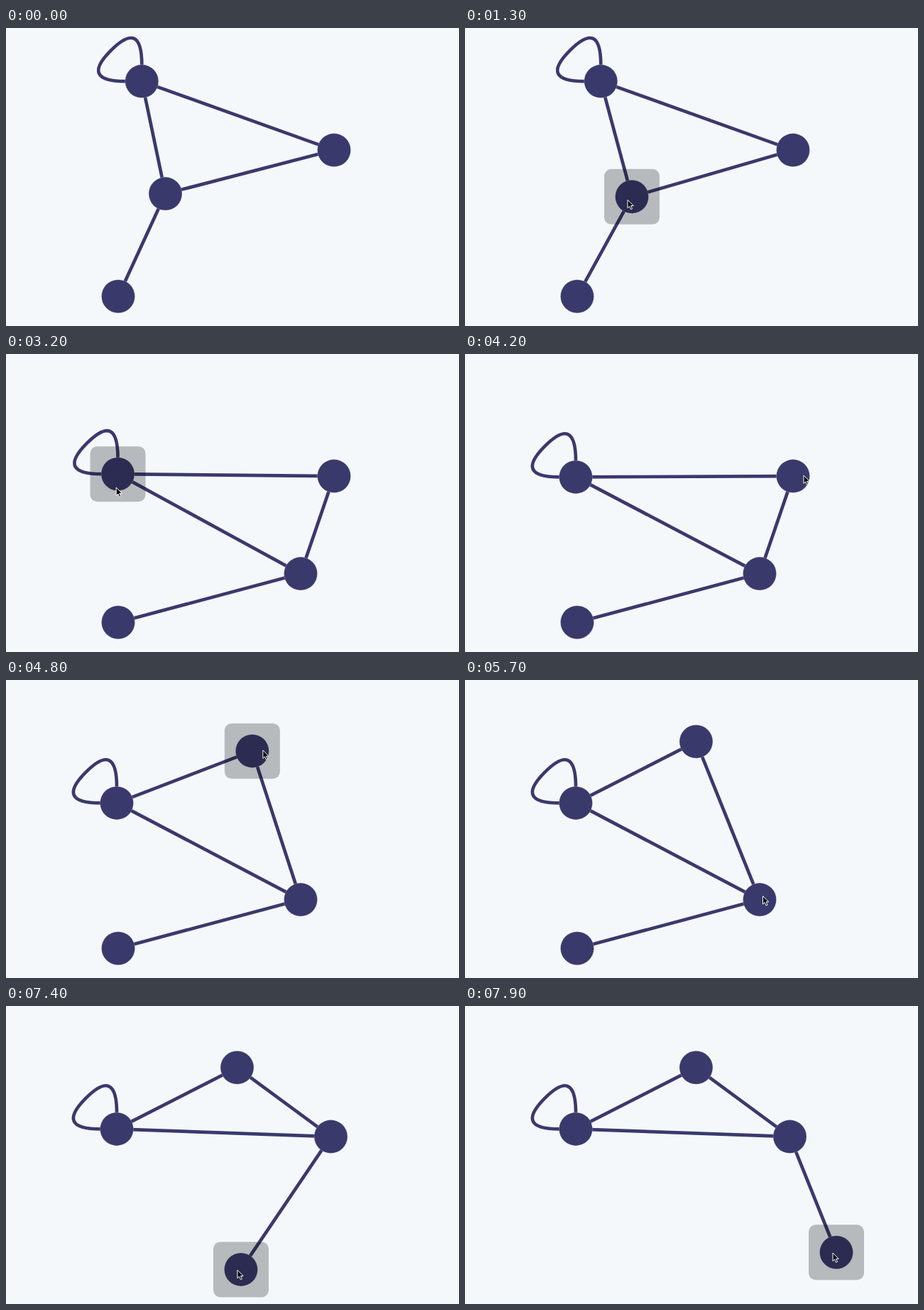
Recreate the animation shown at these times as an HTML page. Size 638 by 420 pixels, loop 8 s.

```html
<!DOCTYPE html>
<html lang="en">
<head>
<meta charset="utf-8">
<title>Draggable graph</title>
<style>
  html, body { margin: 0; width: 100%; height: 100%; overflow: hidden; background: #f4f8fb; }
  svg { display: block; width: 100%; height: 100%; }
  .edge { fill: none; stroke: #3a396c; stroke-width: 4.7; }
  .node { fill: #3a396c; stroke: #f4f8fb; stroke-opacity: .4; stroke-width: .6; }
</style>
</head>
<body>
<svg viewBox="0 0 638 420">
  <g id="graph"></g>
  <rect id="overlay" width="78" height="78" rx="10" fill="#000" fill-opacity=".25"/>
  <path id="cursor" d="M0 0V11.5L2.6 9L4.5 13.4L6.5 12.5L4.6 8.3H8.2Z" fill="#000" stroke="#fff"/>
</svg>
<script>
const DURATION = 8000, STEP = 100, RADIUS = 23.5;
const home = { a: [191.3, 75.1], b: [462, 172.1], c: [224.5, 233.6], d: [158, 378.2] };
const links = ['ab', 'ac', 'bc', 'cd'];

// Pointer moves; one with a node drags it along.
const entry = [355, 381];
const moves = [
  { start: 400, end: 800, to: [218.5, 238] },
  { start: 1200, end: 1900, to: [409, 314], node: 'c' },
  { start: 2000, end: 2400, to: [189, 94] },
  { start: 2500, end: 3300, to: [153.7, 192.3], node: 'a' },
  { start: 3400, end: 3900, to: [477, 171] },
  { start: 4200, end: 5000, to: [340.5, 85.7], node: 'b' },
  { start: 5100, end: 5700, to: [419.5, 304.5] },
  { start: 5800, end: 6200, to: [462, 179], node: 'c' },
  { start: 6400, end: 6800, to: [153, 379] },
  { start: 6800, end: 7300, to: [258, 374], node: 'd' },
  { start: 7300, end: 7600, to: [520, 367], node: 'd' },
  { start: 7700, end: 7900, to: [518, 348], node: 'd' }
];

const graph = document.getElementById('graph');
const overlay = document.getElementById('overlay');
const cursor = document.getElementById('cursor');

function add(tag, attrs) {
  const el = document.createElementNS('http://www.w3.org/2000/svg', tag);
  for (const key in attrs) el.setAttribute(key, attrs[key]);
  return graph.appendChild(el);
}

const place = (el, x, y) => el.setAttribute('transform', `translate(${x} ${y})`);
const show = (el, on) => el.setAttribute('visibility', on ? 'visible' : 'hidden');
const smooth = k => k * k * (3 - 2 * k);
const easeOut = k => 1 - (1 - k) ** 3;

const edges = links.map(() => add('path', { class: 'edge' }));
const loop = add('path', { class: 'edge', d: 'M0 -23Q0 -87 -43.5 -43.5T-23 0' });
loop.setAttribute('d', 'M0 -23Q0 -87 -43.5 -43.5Q-87 0 -23 0');
const nodes = Object.keys(home).map(id => [id, add('circle', { class: 'node', r: RADIUS })]);

function pose(t) {
  const pos = { ...home };
  let pointer = entry, held;
  for (const { start, end, to, node } of moves) {
    if (t <= start) break;
    const k = Math.min(1, (t - start) / (end - start));
    const eased = node ? smooth(k) : easeOut(k);
    const delta = to.map((v, i) => (v - pointer[i]) * eased);
    const shift = point => point.map((v, i) => v + delta[i]);
    pointer = shift(pointer);
    if (node) pos[node] = shift(pos[node]);
    held = node;
  }
  return { pos, pointer, held };
}

function render(t) {
  const { pos, pointer, held } = pose(t);
  edges.forEach((el, i) => {
    const [p, q] = links[i];
    el.setAttribute('d', `M${pos[p]}L${pos[q]}`);
  });
  nodes.forEach(([id, el]) => place(el, ...pos[id]));
  place(loop, ...pos.a);

  show(overlay, held);
  if (held) place(overlay, ...pos[held].map(v => v - 39));
  show(cursor, t >= moves[0].start);
  place(cursor, ...pointer);
}

function tick(now) {
  render(Math.floor(now % DURATION / STEP) * STEP);
  requestAnimationFrame(tick);
}
render(0);
requestAnimationFrame(tick);
</script>
</body>
</html>
```
